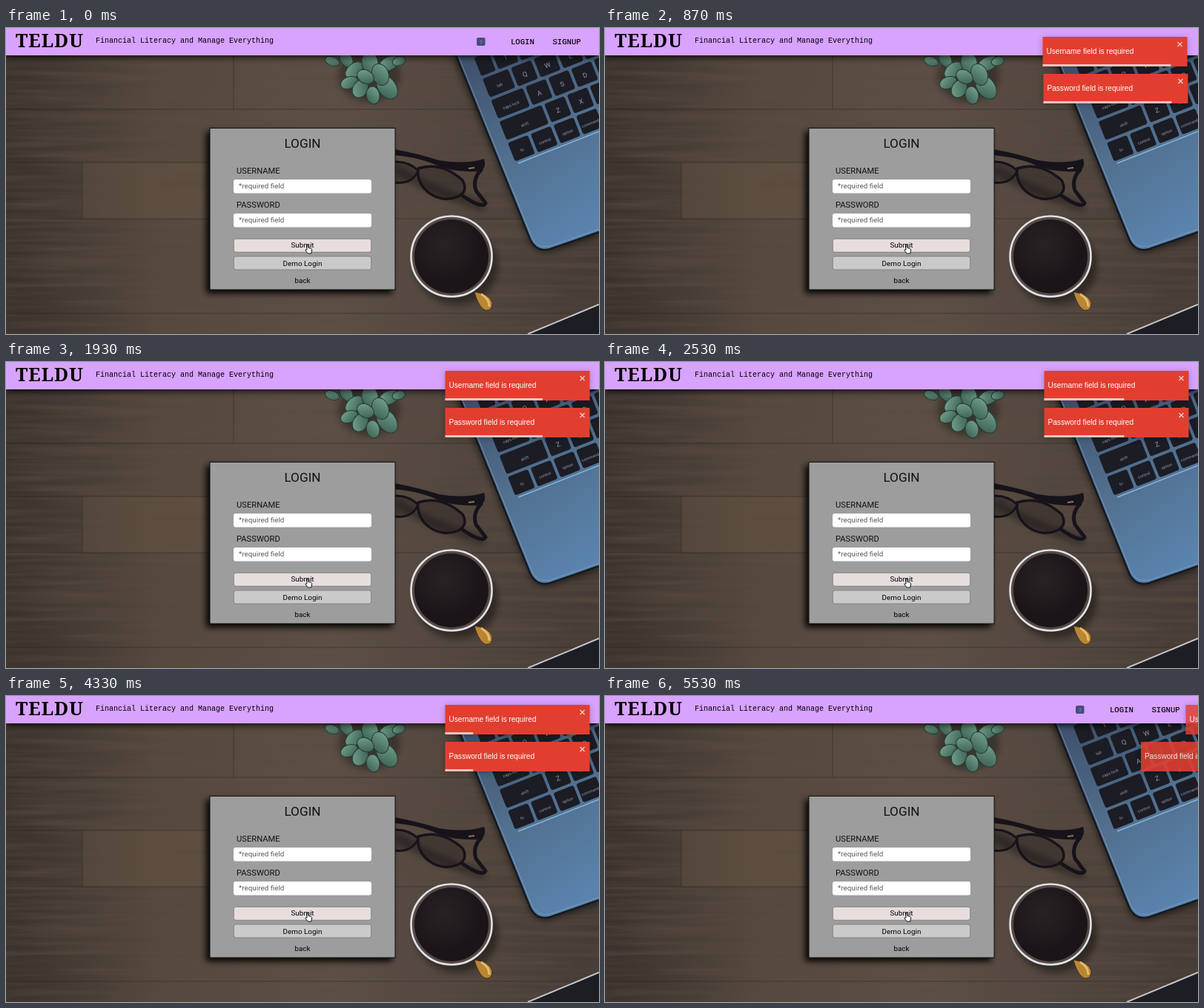
Animation of 800 by 414 pixels, one loop 5.59 s. Source, as an HTML page:

```html
<!DOCTYPE html>
<html lang="en">
<head>
<meta charset="utf-8">
<title>Login form</title>
<style>
  html, body { margin: 0; width: 100%; height: 100%; overflow: hidden; background: #3b322c; }
  svg { display: block; width: 800px; height: 414px; }
  text { font-family: Roboto, Arial, sans-serif; font-size: 9.9px; }
  .mono { font-family: "Liberation Mono", "Courier New", monospace; font-size: 10px; }
  .nav { font-size: 10.6px; stroke: #000; stroke-width: .15px; }
  .brand { font-family: "Noto Serif", serif; font-weight: 900; font-size: 25px; letter-spacing: 1px; }
  .toast text { font-family: "Liberation Sans", Arial, sans-serif; font-size: 10.1px; fill: #fff; }
  .mid { text-anchor: middle; }
  .hint { fill: #5c5c5c; }
  .label { font-size: 11.2px; fill: #111; }
</style>
</head>
<body>
<svg viewBox="0 0 800 414">
  <defs>
    <linearGradient id="wood">
      <stop offset="0" stop-color="#3a322d"/>
      <stop offset=".25" stop-color="#54473d"/>
      <stop offset=".55" stop-color="#5c4f45"/>
      <stop offset="1" stop-color="#453b36"/>
    </linearGradient>
    <linearGradient id="metal" x1=".2" x2=".7" y2="1">
      <stop offset="0" stop-color="#40536e"/>
      <stop offset=".5" stop-color="#52708f"/>
      <stop offset="1" stop-color="#5a83ad"/>
    </linearGradient>
    <linearGradient id="leaf" x2="1" y2="1">
      <stop offset="0" stop-color="#7aa892"/>
      <stop offset="1" stop-color="#35594d"/>
    </linearGradient>
    <radialGradient id="coffee" cx=".4" cy=".35">
      <stop offset="0" stop-color="#292225"/>
      <stop offset="1" stop-color="#1b1519"/>
    </radialGradient>
    <filter id="grain" x="0" y="0" width="1" height="1">
      <feTurbulence type="fractalNoise" baseFrequency=".005 .11" numOctaves="3" seed="4"/>
      <feColorMatrix values="0 0 0 0 .1  0 0 0 0 .07  0 0 0 0 .05  1.6 0 0 0 -.62"/>
    </filter>
    <filter id="soft" x="-30%" y="-30%" width="160%" height="160%"><feGaussianBlur stdDeviation="4"/></filter>
  </defs>

  <!-- desk -->
  <rect width="800" height="414" fill="url(#wood)"/>
  <rect x="103" y="182" width="422" height="76" fill="#7a6350" opacity=".22"/>
  <rect width="800" height="414" filter="url(#grain)"/>
  <path d="M0 110H660M0 182H275M0 258H800M0 386H800M307 37V110M103 182V258" fill="none" stroke="#211a17" stroke-opacity=".4"/>

  <!-- plant -->
  <ellipse cx="490" cy="64" rx="42" ry="36" opacity=".3" filter="url(#soft)"/>
  <g id="plant"></g>

  <!-- laptop -->
  <path d="M602 37L704 283Q712 307 734 303L800 281V37Z" opacity=".5" filter="url(#soft)"/>
  <path d="M607 37L706 283Q714 304 734 299L800 276V37Z" fill="url(#metal)"/>
  <path d="M607 37L706 283Q714 304 734 299L800 276" fill="none" stroke="#15191f" stroke-width="2.5"/>
  <path d="M610 37L709 282Q716 299 734 295L800 272" fill="none" stroke="#86a9cc" stroke-opacity=".6"/>
  <path d="M691 183L800 140" stroke="#86b4dc" stroke-width="1.5"/>
  <g id="keys" transform="translate(696 163) rotate(-21.5)"></g>

  <!-- glasses -->
  <path d="M526 190Q575 222 646 242" fill="none" stroke="#000" stroke-opacity=".35" stroke-width="12" filter="url(#soft)"/>
  <path d="M524 164Q556 170 584 179Q620 185 645 177Q649 188 640 194Q600 196 575 183Q550 174 524 172Z" fill="#17131a"/>
  <g fill="none" stroke="#17131a" stroke-linecap="round" stroke-linejoin="round">
    <path d="M641 192Q629 204 634 220L647 237Q642 245 616 227" stroke-width="5"/>
    <path d="M556 190Q587 180 616 206Q624 221 610 228C583 240 552 217 556 190Z" stroke-width="3.5" fill="#17131a" fill-opacity=".3"/>
    <path d="M524 181Q543 180 556 193Q548 212 524 209" stroke-width="3" fill="#17131a" fill-opacity=".3"/>
  </g>
  <path d="M624 190l8 -1" stroke="#8b7960" stroke-width="2"/>

  <!-- cup -->
  <ellipse cx="608" cy="322" rx="56" ry="52" opacity=".4" filter="url(#soft)"/>
  <path d="M632 357Q653 360 656 372Q656 383 647 382Q640 380 634 364Z" fill="#b98633" stroke="#403026"/>
  <path d="M641 360Q652 366 652 377" fill="none" stroke="#e4bd72" stroke-width="3"/>
  <circle cx="601" cy="309" r="54.5" fill="#574944" stroke="#dfe3ea" stroke-width="2.6"/>
  <circle cx="601" cy="309" r="50" fill="url(#coffee)"/>

  <!-- tablet corner -->
  <path d="M704 414L800 374V414Z" fill="#1d1d24"/>
  <path d="M704 414L800 374" stroke="#c6c7cb" stroke-width="2"/>

  <!-- header -->
  <rect y="1" width="800" height="39" opacity=".75" filter="url(#soft)"/>
  <rect width="800" height="37" fill="#d8a2ff"/>
  <text class="brand" x="13" y="26">TELDU</text>
  <text class="mono" x="121" y="20">Financial Literacy and Manage Everything</text>
  <rect x="635" y="13" width="11.5" height="11" rx="2" fill="#42507f"/>
  <text x="640.8" y="21.5" class="mid" style="font-size:8px" fill="#c78291">?</text>
  <text class="mono nav" x="681" y="22">LOGIN</text>
  <text class="mono nav" x="737.5" y="22">SIGNUP</text>

  <!-- form -->
  <rect x="270" y="140" width="251" height="219" opacity=".95" filter="url(#soft)"/>
  <rect x="275" y="135.5" width="250" height="218.5" fill="#9d9d9d" stroke="#111"/>
  <text x="400" y="162" class="mid" style="font-size:17.2px" fill="#111">LOGIN</text>
  <text class="label" x="311" y="196.5">USERNAME</text>
  <text class="label" x="311" y="242.5">PASSWORD</text>
  <g fill="#fff">
    <rect x="307" y="205" width="186" height="18.5" rx="3"/>
    <rect x="307" y="251" width="186" height="18.5" rx="3"/>
  </g>
  <text class="hint" x="314" y="217">*required field</text>
  <text class="hint" x="314" y="263">*required field</text>
  <g stroke="#777" stroke-width=".8">
    <rect x="307.3" y="285.3" width="185.4" height="18" rx="3" fill="#e7dddd"/>
    <rect x="307.3" y="309" width="185.4" height="18" rx="3" fill="#cacaca"/>
  </g>
  <text class="mid" x="400" y="297">Submit</text>
  <text class="mid" x="400" y="322">Demo Login</text>
  <text class="mid" x="400" y="344.5">back</text>
  <path d="M406 300V294.2Q407 292.7 408 294.2V297.5L411.5 298.3Q413 299 412.6 301L411.8 305H407.2L404 300.8Q404 299 406 300Z" fill="#fff" stroke="#000" stroke-width=".9"/>

  <g id="toasts"></g>
</svg>
<script>
const $ = id => document.getElementById(id);

// Leaves: x, y, length, width, angle
$("plant").innerHTML = [
  [440, 45, 10, 6, 20], [459, 42, 12, 8, 60], [470, 57, 14, 9, -40], [491, 47, 15, 11, 80],
  [517, 48, 15, 9, -25], [463, 74, 12, 8, -20], [478, 82, 13, 10, -60], [514, 80, 18, 12, 55],
  [505, 63, 15, 11, 70], [530, 45, 9, 6, -15], [495, 91, 12, 9, 80], [485, 66, 12, 9, 30]
].map(([x, y, rx, ry, a]) =>
  `<ellipse rx="${rx}" ry="${ry}" transform="translate(${x} ${y}) rotate(${a})" fill="url(#leaf)" stroke="#233c34"/>`).join("");

// Keyboard: every row opens with one wide key, then evenly spaced ones
const rows = [
  [18, ["fn", "control", "option", "command"]],
  [50, ["shift", "Z", "X", "C", "V"]],
  [35, ["caps lock", "A", "S", "D", "F"]],
  [26, ["tab", "Q", "W", "E", "R"]],
  [10, ["", "1", "2", "3", "4"]]
];
$("keys").innerHTML = rows.map(([start, names], row) => names.map((name, i) => {
  const x = i ? start + (i - 1) * 33 : -15, w = i ? 29 : start + 11, y = -14 - row * 31;
  const size = name.length > 1 ? 5.5 : 9;
  return `<rect x="${x}" y="${y}" width="${w}" height="27" rx="3" fill="#1b1c24"/>
    <text class="mid" x="${x + w / 2}" y="${y + 18}" fill="#929bab" style="font-size:${size}px">${name}</text>`;
}).join("")).join("");

const toasts = [
  { name: "Username", y: 12, enter: 288, leave: 5315 },
  { name: "Password", y: 62, enter: 301, leave: 5330 }
];
for (const toast of toasts) {
  $("toasts").insertAdjacentHTML("beforeend", `<g class="toast">
    <rect y="1" width="195" height="40" opacity=".25" filter="url(#soft)"/>
    <rect width="195" height="40" rx=".6" fill="#e23e30"/>
    <rect class="bar" y="37" width="195" height="3" fill="#f6c2bb"/>
    <text x="5" y="23">${toast.name} field is required</text>
    <path d="M182 7l6 6m0 -6l-6 6" stroke="#f9d5d1" stroke-width="1.2"/>
  </g>`);
  toast.node = $("toasts").lastElementChild;
  toast.bar = toast.node.querySelector(".bar");
}

function bezier(x1, y1, x2, y2) {
  const at = (a, b, u) => 3 * a * u * (1 - u) ** 2 + 3 * b * u * u * (1 - u) + u ** 3;
  return x => {
    let lo = 0, hi = 1;
    for (let i = 0; i < 24; i++) {
      const mid = (lo + hi) / 2;
      if (at(x1, x2, mid) < x) lo = mid; else hi = mid;
    }
    return at(y1, y2, lo);
  };
}

// Keyframes: progress, shift, opacity
const bounceIn = [[0, 3000, 0], [.6, -25, 1], [.75, 10, 1], [.9, -5, 1], [1, 0, 1]];
const bounceOut = [[0, 0, 1], [.2, -20, 1], [1, 2000, 0]];
const easeIn = bezier(.215, .61, .355, 1), easeOut = bezier(.25, .1, .25, 1);
const SCALE = .609, MOVE = 700, LIFE = 5000, LOOP = 5590, STEP = 200 / 3;
const clamp = x => Math.min(1, Math.max(0, x));

function sample(frames, ease, p) {
  p = clamp(p);
  const i = Math.max(1, frames.findIndex(f => f[0] >= p));
  const [p0, x0, o0] = frames[i - 1], [p1, x1, o1] = frames[i];
  const k = ease((p - p0) / (p1 - p0));
  return [x0 + (x1 - x0) * k, o0 + (o1 - o0) * k];
}

function draw(now) {
  const t = Math.floor((now % LOOP + 5) / STEP) * STEP;
  for (const { node, bar, y, enter, leave } of toasts) {
    const [x, opacity] = t < leave
      ? sample(bounceIn, easeIn, (t - enter) / MOVE)
      : sample(bounceOut, easeOut, (t - leave) / MOVE);
    node.setAttribute("transform", `translate(${592.5 + x * SCALE} ${y})`);
    node.setAttribute("opacity", opacity);
    bar.setAttribute("width", 195 * clamp(1 - (t - 300) / LIFE));
  }
}

const begin = performance.now();
function tick() {
  draw(performance.now() - begin);
  requestAnimationFrame(tick);
}
tick();
</script>
</body>
</html>
```
